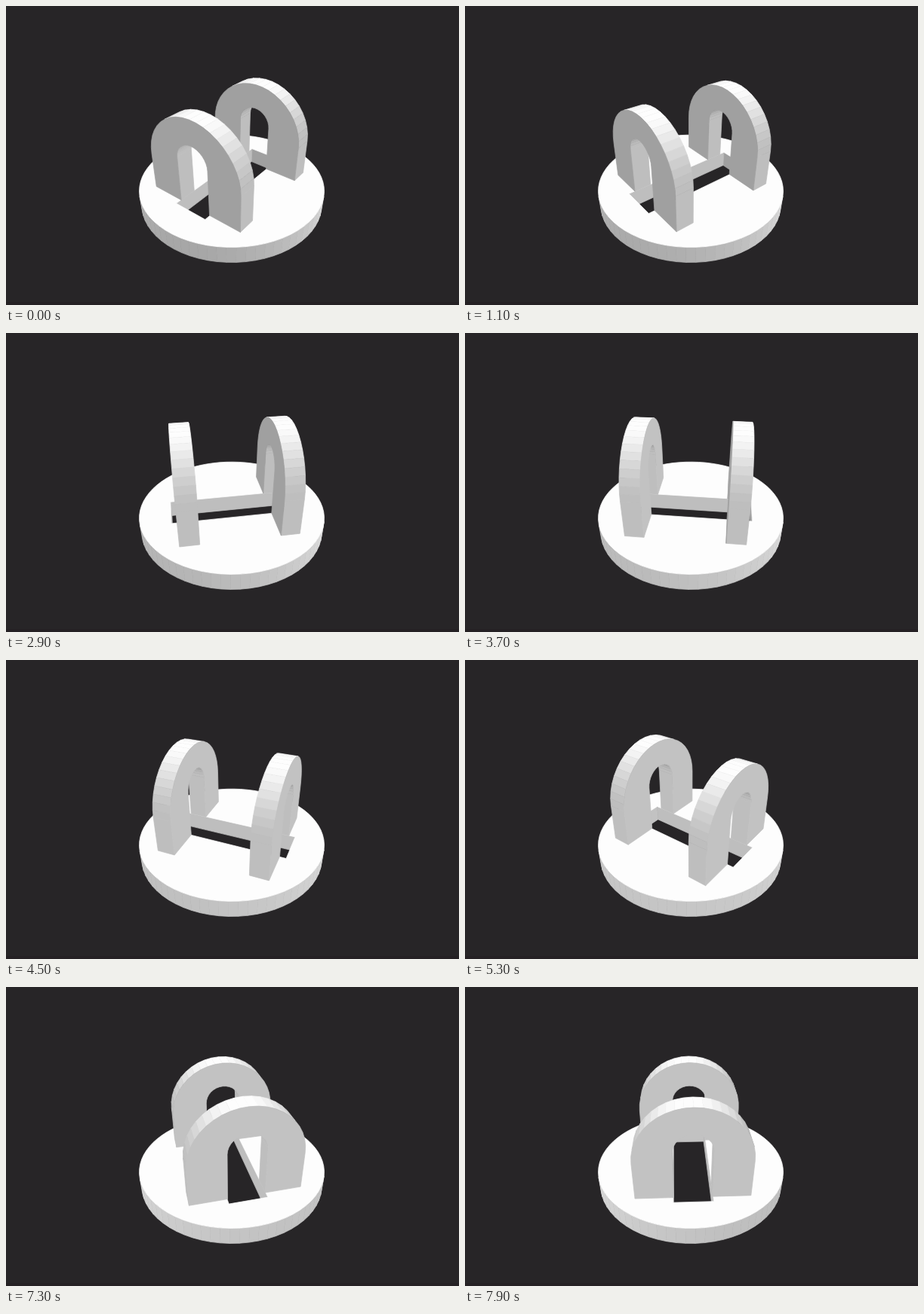
These frames come from a looping animation (600 px wide and 397 px high, 8 s). An HTML page with a canvas:

```html
<!DOCTYPE html>
<html lang="en">
<head>
<meta charset="utf-8">
<title>Rotating arches</title>
<style>
  html, body { margin: 0; width: 100%; height: 100%; overflow: hidden; background: #272527; }
  canvas { display: block; width: 600px; height: 397px; }
</style>
</head>
<body>
<canvas id="stage" width="600" height="397"></canvas>
<script>
const ctx = document.getElementById('stage').getContext('2d');
const BG = '#272527';
const LOOP = 8000, STEP = 100;

// Camera: tilt, focal length in px, distance to the disc, vertical offset
const SIN = 0.54, COS = 0.8417, FOCAL = 479, DIST = 4, LIFT = 0.264;
const CENTER = { x: 299, y: 198.5 };
const EYE = { y: DIST * SIN + LIFT * COS, z: DIST * COS - LIFT * SIN };

// Model, in units of the disc radius
const THICK = 0.194;
const SLOT = { u: 0.194, n: 0.667 };
const ARCH = { near: 0.404, far: 0.598, half: 0.562, spring: 0.418, inHalf: 0.19, inSpring: 0.525 };
const DISC_SIDES = 72, OUTER_SIDES = 22, INNER_SIDES = 16;

let sinA = 0, cosA = 1;

// Body coordinates are [u across an arch, y up, n along the slot]
const turn = ([u, y, n]) => [n * sinA + u * cosA, y, n * cosA - u * sinA];

function project(p) {
  const [x, y, z] = turn(p);
  const k = FOCAL / (DIST - z * COS - y * SIN);
  return [CENTER.x + x * k, CENTER.y - (y * COS - z * SIN - LIFT) * k];
}

function facesEye(point, normal) {
  const [px, py, pz] = turn(point), [nx, ny, nz] = turn(normal);
  return -px * nx + (EYE.y - py) * ny + (EYE.z - pz) * nz > 0;
}

// The light turns with the body; glow brightens surfaces seen at a slant
function shade([u, y, n], glow) {
  const toward = turn([u, y, n])[2];
  let v = 177 + 13 * u - 17 * n + (y > 0 ? 77 : 40) * y * Math.abs(y);
  v += glow * (1 - Math.abs(toward));
  v = Math.round(Math.min(253, v));
  return `rgb(${v},${v},${v})`;
}

function addLoop(points) {
  points.forEach((p, i) => ctx[i ? 'lineTo' : 'moveTo'](...project(p)));
  ctx.closePath();
}

function paint(loops, normal, glow = 0) {
  if (!facesEye(loops[0][0], normal)) return;
  ctx.beginPath();
  loops.forEach(addLoop);
  ctx.fillStyle = ctx.strokeStyle = shade(normal, glow);
  ctx.fill('evenodd');
  ctx.stroke();
}

function ring(y) {
  return Array.from({ length: DISC_SIDES }, (_, i) => {
    const a = i / DISC_SIDES * 2 * Math.PI;
    return [Math.sin(a), y, Math.cos(a)];
  });
}
const rimTop = ring(0), rimLow = ring(-THICK);
const slotEdge = [[-1, -1], [1, -1], [1, 1], [-1, 1]].map(([u, n]) => [u * SLOT.u, 0, n * SLOT.n]);

function drawSlotWalls() {
  const inward = [[0, 0, 1], [-1, 0, 0], [0, 0, -1], [1, 0, 0]];
  // The walls reach a little above the floor, which then covers their edge
  const at = (p, y) => [p[0], y, p[2]];
  slotEdge.forEach((p, i) => {
    const q = slotEdge[(i + 1) % 4];
    paint([[at(p, 0.01), at(q, 0.01), at(q, -THICK), at(p, -THICK)]], inward[i]);
  });
}

function drawDisc() {
  drawSlotWalls();
  rimTop.forEach((p, i) => {
    const j = (i + 1) % DISC_SIDES;
    const a = (i + 0.5) / DISC_SIDES * 2 * Math.PI;
    paint([[p, rimTop[j], rimLow[j], rimLow[i]]], [Math.sin(a), 0, Math.cos(a)], 35);
  });
  paint([rimTop, slotEdge], [0, 1, 0]);
}

// Outline of an upright arch: foot, half circle, foot
function archLine(half, spring, sides) {
  const line = [[-half, 0]];
  for (let i = 0; i <= sides; i++) {
    const a = Math.PI * (1 - i / sides);
    line.push([half * Math.cos(a), spring + half * Math.sin(a)]);
  }
  line.push([half, 0]);
  return line;
}
const outer = archLine(ARCH.half, ARCH.spring, OUTER_SIDES);
const inner = archLine(ARCH.inHalf, ARCH.inSpring, INNER_SIDES);
const face = [...outer, ...inner.slice().reverse()];

function drawBand(line, n0, n1, sign) {
  for (let i = 1; i < line.length; i++) {
    const [u0, y0] = line[i - 1], [u1, y1] = line[i];
    const len = Math.hypot(u1 - u0, y1 - y0);
    const normal = [sign * (y0 - y1) / len, sign * (u1 - u0) / len, 0];
    paint([[[u0, y0, n0], [u1, y1, n0], [u1, y1, n1], [u0, y0, n1]]], normal);
  }
}

function drawArch(side) {
  const n0 = side * ARCH.near, n1 = side * ARCH.far;
  drawBand(inner, n0, n1, -1);
  drawBand(outer, n0, n1, 1);
  paint([face.map(([u, y]) => [u, y, n1])], [0, 0, side]);
  paint([face.map(([u, y]) => [u, y, n0])], [0, 0, -side]);
}

// Degrees; the turn speeds up once
function angleAt(t) {
  const s = t / 1000, change = 2.2;
  return -37.7 - 13.35 * Math.min(s, change) - 19.4 * Math.max(0, s - change);
}

function draw(now) {
  const t = Math.floor(now % LOOP / STEP) * STEP;
  const a = angleAt(t) * Math.PI / 180;
  sinA = Math.sin(a);
  cosA = Math.cos(a);
  ctx.fillStyle = BG;
  ctx.fillRect(0, 0, 600, 397);
  ctx.fillStyle = '#252124';
  ctx.fillRect(0, 393, 600, 4);
  ctx.lineWidth = 0.75;
  ctx.lineJoin = 'round';
  drawDisc();
  const front = cosA > 0 ? 1 : -1;
  drawArch(-front);
  drawArch(front);
  requestAnimationFrame(draw);
}
requestAnimationFrame(draw);
</script>
</body>
</html>
```
